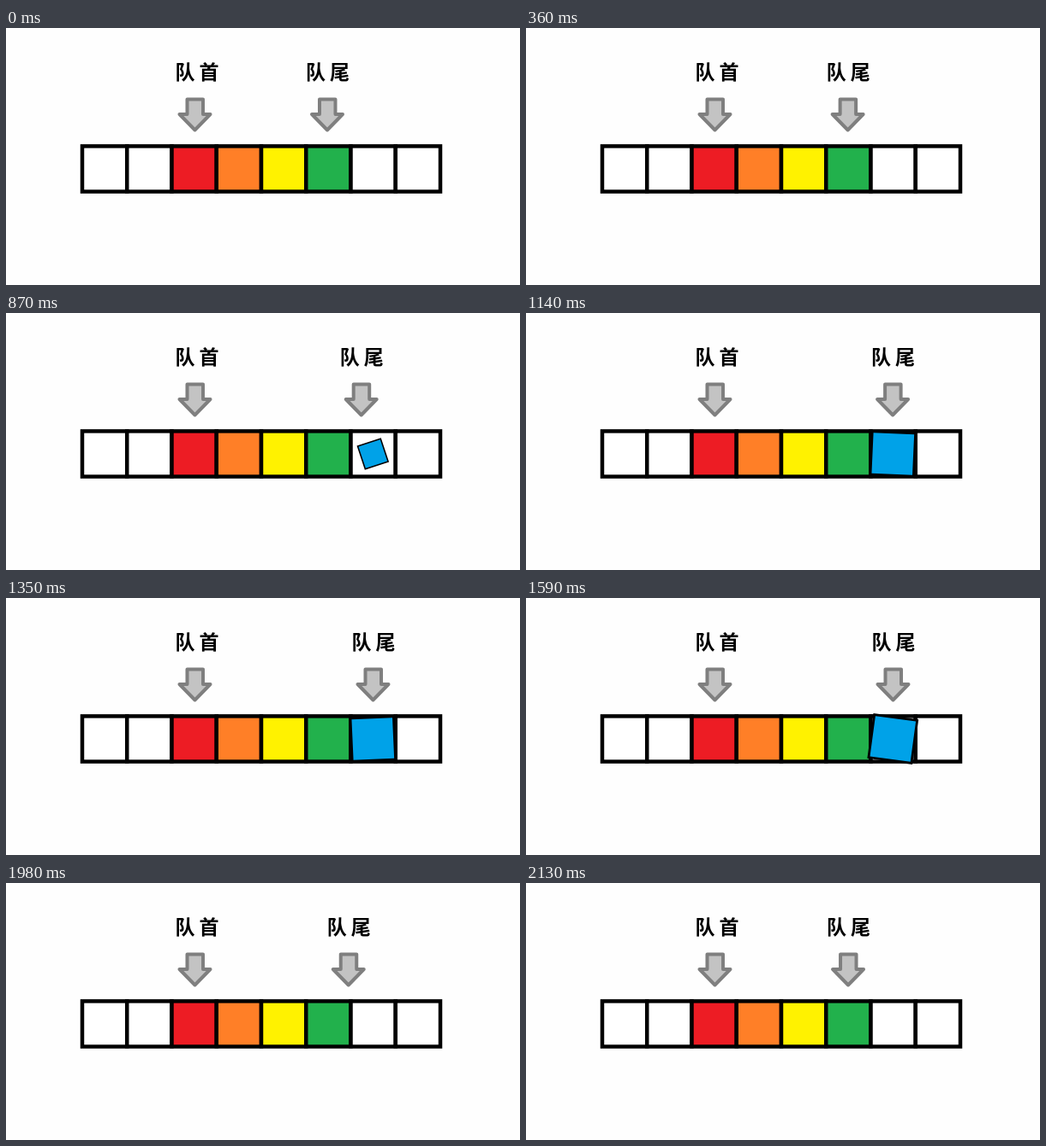
An HTML page that plays this animation: 600 by 301 pixels, repeating every 2310 ms.

```html
<!DOCTYPE html>
<html lang="zh">
<head>
<meta charset="utf-8">
<title>队列</title>
<style>
  html, body { margin: 0; width: 100%; height: 100%; overflow: hidden; background: #fefefe; }
  svg { display: block; width: 600px; height: 301px; }
  text { font: 900 23px "Noto Sans CJK SC", "Noto Sans CJK", sans-serif; letter-spacing: 5px; }
  .arrow { fill: #c3c3c3; stroke: #7f7f7f; stroke-width: 4; stroke-linejoin: round; }
</style>
</head>
<body>
<svg viewBox="0 0 600 301">
  <defs>
    <path id="arrow" class="arrow" d="M-9 83.5H9.5V101H18L0 119.5L-18 101H-9Z"/>
  </defs>
  <g id="cells" stroke="#000" stroke-width="4.5"></g>
  <text x="197.5" y="60.3">队首</text>
  <use href="#arrow" x="220.5"/>
  <g id="tail">
    <text x="350" y="60.3">队尾</text>
    <use href="#arrow" x="375"/>
  </g>
  <rect id="block" x="-25.2" y="-25.2" width="50.4" height="50.4" fill="#00a2e8" stroke="#000" stroke-width="2.8"/>
</svg>
<script>
const LOOP = 2310, STEP = 30, LAST = 2130;
const cells = document.getElementById('cells');
const tail = document.getElementById('tail');
const block = document.getElementById('block');

const colors = ['#fff', '#fff', '#ed1c24', '#ff7f27', '#fff200', '#22b14c', '#fff', '#fff'];
const pitch = 52.25;
cells.innerHTML = colors.map((fill, i) =>
  `<rect x="${89 + i * pitch}" y="138.4" width="${pitch}" height="53.2" fill="${fill}"/>`).join('');

const progress = (t, from, to) => Math.min(1, Math.max(0, (t - from) / (to - from)));
const ease = p => p < 0.5 ? 2 * p * p : 1 - 2 * (1 - p) * (1 - p);

// Rocking after the block has landed: [time, degrees]
const rock = [[1130, 0], [1200, 18], [1270, 18], [1410, -18], [1550, 18], [1690, -18], [1770, 0]];

function rockAngle(t) {
  for (let i = 1; i < rock.length; i++) {
    const [t0, a0] = rock[i - 1], [t1, a1] = rock[i];
    if (t < t1) return a0 + (a1 - a0) * progress(t, t0, t1);
  }
  return 0;
}

function draw(t) {
  const shift = 53.5 * (ease(progress(t, 290, 1195)) - ease(progress(t, 1776, 2169)));
  tail.setAttribute('transform', `translate(${shift})`);

  const grow = progress(t, 540, 1130);
  const leave = progress(t, 1765, 1975);
  const scale = grow * (1 - leave);
  const angle = grow < 1 ? -450 * (1 - grow) : rockAngle(t);
  block.setAttribute('transform', `translate(428.3 165) rotate(${angle}) scale(${scale})`);
  block.setAttribute('opacity', 1 - leave);
  block.setAttribute('visibility', scale > 0 ? 'visible' : 'hidden');
}

const start = performance.now();
function tick() {
  const t = (performance.now() - start) % LOOP;
  draw(Math.min(LAST, Math.floor(t / STEP) * STEP));
  requestAnimationFrame(tick);
}
tick();
</script>
</body>
</html>
```
